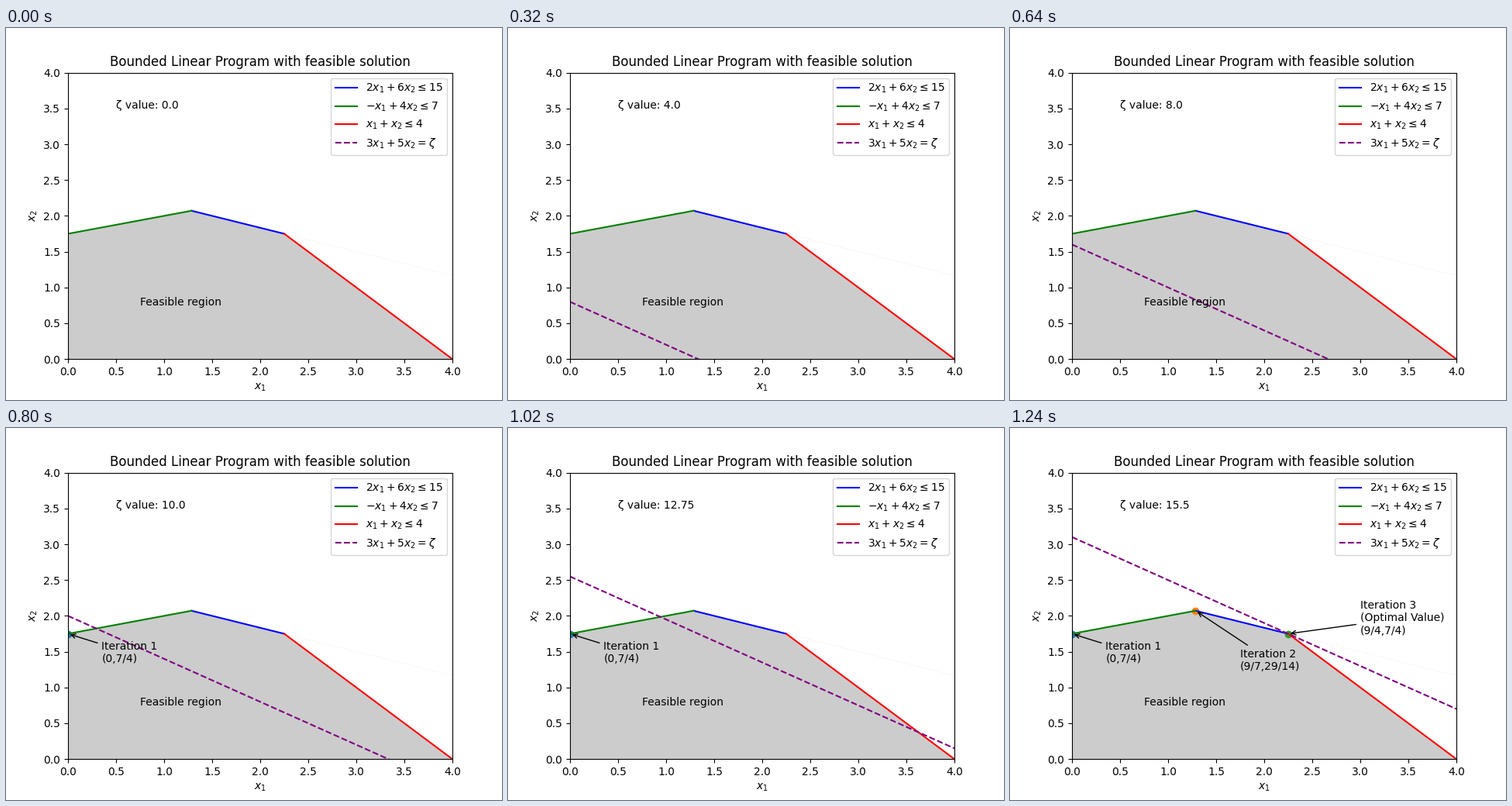
Write a matplotlib script that moves like this. It is 640 px wide and 480 px high and loops after 1260 ms.

```python
import matplotlib.pyplot as plt
from matplotlib.animation import FuncAnimation

FRAMES, INTERVAL = 63, 20
STEP = 0.25  # growth of the objective value per frame

plt.rcParams["font.family"] = "DejaVu Sans"
fig, ax = plt.subplots(figsize=(6.4, 4.8), dpi=100)
ax.set(xlim=(0, 4), ylim=(0, 4), xlabel="$x_1$", ylabel="$x_2$",
       title="Bounded Linear Program with feasible solution")

# Corners of the feasible region along its upper boundary
start, peak, optimum, end = (0, 7 / 4), (9 / 7, 29 / 14), (9 / 4, 7 / 4), (4, 0)
ax.fill(*zip((0, 0), start, peak, optimum, end), color="#cccccc", lw=0, zorder=1)
ax.plot([9 / 4, 4], [7 / 4, 7 / 6], color="#eeeeee", lw=0.5,
        dashes=(4, 2), zorder=1)


def edge(p, q, color, label):
    ax.plot(*zip(p, q), color=color, label=label)


edge(peak, optimum, "b", r"$2x_1 + 6x_2 \leq 15$")
edge(start, peak, "g", r"$-x_1 + 4x_2 \leq 7$")
edge(optimum, end, "r", r"$x_1 + x_2 \leq 4$")
objective, = ax.plot([], [], "--", color="purple", label=r"$3x_1 + 5x_2 = \zeta$")
ax.legend(loc="upper right")

ax.text(0.75, 0.75, "Feasible region")
value = ax.text(0.5, 3.5, "")


def stop(point, color, text, place):
    """A corner with its note, and the objective value that reaches it."""
    dot = ax.scatter(*point, color=color, zorder=1.5)
    note = ax.annotate(text, xy=point, xytext=place,
                       arrowprops=dict(arrowstyle="->"))
    return 3 * point[0] + 5 * point[1], (dot, note)


stops = [
    stop(start, "C0", "Iteration 1\n(0,7/4)", (0.35, 1.35)),
    stop(peak, "C1", "Iteration 2\n(9/7,29/14)", (1.75, 1.25)),
    stop(optimum, "C2", "Iteration 3\n(Optimal Value)\n(9/4,7/4)", (3, 1.75)),
]


def update(i):
    zeta = i * STEP
    objective.set_data([0, 4], [zeta / 5, (zeta - 12) / 5])
    value.set_text(f"ζ value: {zeta}")
    for level, artists in stops:
        for artist in artists:
            artist.set_visible(zeta >= level - 1e-9)


anim = FuncAnimation(fig, update, frames=FRAMES, interval=INTERVAL,
                     init_func=lambda: update(0), repeat=True, repeat_delay=0)
plt.show()
```
